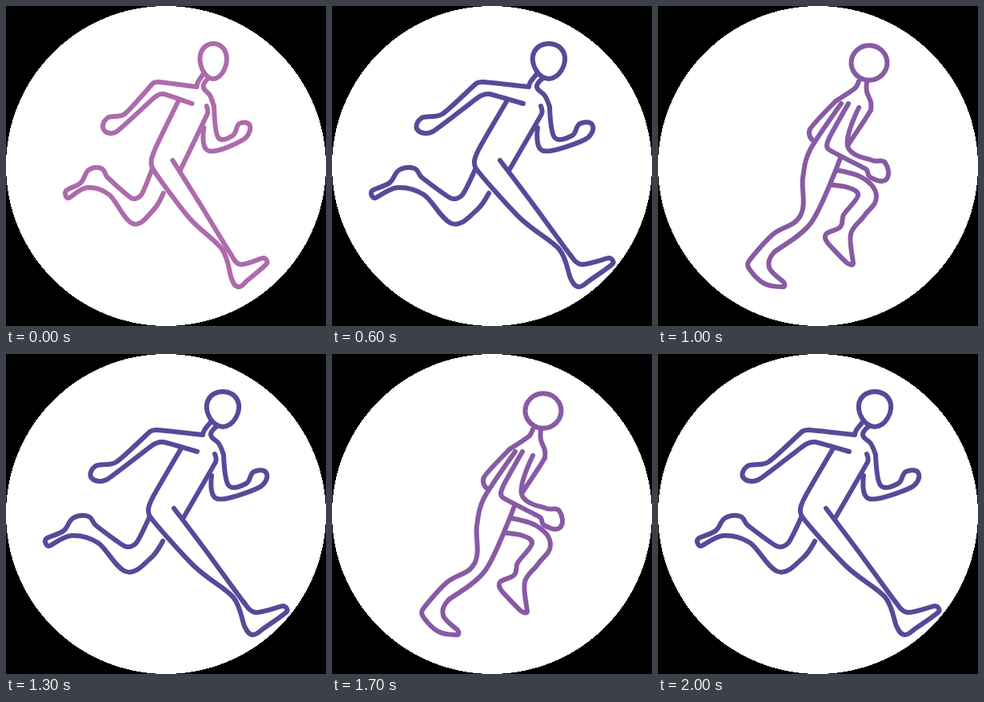
These frames come from a looping animation (400x400 px, 2100 ms). An HTML page:

```html
<!DOCTYPE html>
<html lang="en">
<head>
<meta charset="utf-8">
<title>Runner</title>
<style>
  html, body { margin: 0; width: 100%; height: 100%; overflow: hidden; background: #000; }
  svg { display: block; width: 100%; height: 100%; }
  path { stroke-width: 6; stroke-linecap: round; stroke-linejoin: round; }
</style>
</head>
<body>
<svg viewBox="0 0 400 400">
  <circle cx="200" cy="200" r="200" fill="#fff" shape-rendering="crispEdges"/>
  <g id="runner"></g>
</svg>
<script>
const STEP = 100, STEPS = 7, SQUEEZE = 1 / 1.2;
const PINK = [173, 107, 171], PURPLE = [136, 90, 164], INDIGO = [88, 73, 153];
const runner = document.getElementById('runner');
const parts = [];

const mix = (a, b, t) => a + (b - a) * t;
const parse = text => text.split(' ').map(pair => pair.split(',').map(Number));

// Key points of one part in the long stride and in the push-off pose.
function part(stride, push, { fill = '#fff', closed = false, line = true } = {}) {
  const el = document.createElementNS('http://www.w3.org/2000/svg', 'path');
  el.setAttribute('fill', fill);
  if (!line) el.setAttribute('stroke', 'none');
  runner.append(el);
  parts.push({ el, closed, stride, push });
}

const limb = (stride, push, options) => part(parse(stride), parse(push), options);

// Oval that narrows towards the chin.
function oval(cx, cy, rx, ry, chin) {
  return Array.from({ length: 12 }, (_, i) => {
    const a = i * Math.PI / 6;
    return [cx + rx * Math.cos(a) * (1 - chin * Math.sin(a)), cy + ry * Math.sin(a)];
  });
}

// far arm, tucked behind the back at push-off
limb('272,126 278,164 300,162 310,147 326,150 316,167 264,181 257,152',
     '228,138 222,155 220,158 220,160 218,164 196,169 190,154 222,119');
// far leg
limb('180,202 163,236 148,240 112,214 103,203 84,205 72,221 50,231 54,240 82,227 115,236 150,272 180,256 196,234',
     '212,223 238,227 250,237 232,261 228,276 210,285 212,296 236,321 244,322 241,285 258,262 273,238 256,215 222,205');
// torso cover
limb('225,122 255,128 221,204 182,185', '229,122 262,120 226,190 190,185',
     { closed: true, line: false });
// back and near leg
limb('219,118 182,182 180,203 235,265 284,304 298,340 308,351 322,343 351,322 346,315 312,323 297,310 250,246 210,193',
     '229,122 190,180 181,215 178,262 143,286 113,320 115,330 133,347 157,351 157,345 139,327 145,308 192,270 228,190');
// chest
limb('261,125 262,135 221,206', '266,130 258,143 236,176', { fill: 'none' });
// near arm
limb('246,101 190,95 180,97 138,135 112,140 107,155 126,157 183,114 196,110 239,122',
     '238,122 214,165 213,179 260,204 265,214 285,217 284,196 268,193 237,175 251,127');
// neck
limb('256,85 248,95 246,101', '251,94 246,103 222,119', { fill: 'none' });
limb('264,90 256,101 266,112 272,126', '261,95 261,107 266,120 266,130', { fill: 'none' });
// head
part(oval(271, 69, 20, 22, 0.14), oval(264, 71, 22.5, 21.8, 0), { closed: true });

// Smooth curve through the points; handles stay short next to short segments.
function curve(points, closed) {
  const n = points.length;
  const at = i => closed ? points[(i + n) % n] : points[Math.max(0, Math.min(n - 1, i))];
  const dist = (a, b) => Math.hypot(b[0] - a[0], b[1] - a[1]);
  const handle = (i, sign) => {
    const a = at(i - 1), p = at(i), b = at(i + 1);
    const reach = sign * 0.38 * Math.min(dist(a, p), dist(p, b)) / (dist(a, b) || 1);
    return [p[0] + (b[0] - a[0]) * reach, p[1] + (b[1] - a[1]) * reach];
  };
  let d = 'M' + points[0];
  for (let i = 0; i < (closed ? n : n - 1); i++) {
    d += `C${handle(i, 1)} ${handle(i + 1, -1)} ${at(i + 1)}`;
  }
  return closed ? d + 'Z' : d;
}

function draw(step) {
  const early = step < 3;
  const bend = 1 - Math.abs(step - 3) / 3;
  const widen = early ? SQUEEZE : 1;
  const end = early ? PINK : INDIGO;
  const color = end.map((c, i) => Math.round(mix(c, PURPLE[i], bend)));
  runner.setAttribute('stroke', `rgb(${color})`);
  for (const { el, closed, stride, push } of parts) {
    const points = stride.map(([x, y], i) => [
      mix(200 + (x - 200) * widen, push[i][0], bend),
      mix(y, push[i][1], bend)
    ]);
    el.setAttribute('d', curve(points, closed));
  }
}

const start = performance.now();
let shown = 0;
function tick() {
  const step = Math.floor((performance.now() - start) / STEP) % STEPS;
  if (step !== shown) draw(shown = step);
  requestAnimationFrame(tick);
}
draw(0);
tick();
</script>
</body>
</html>
```
